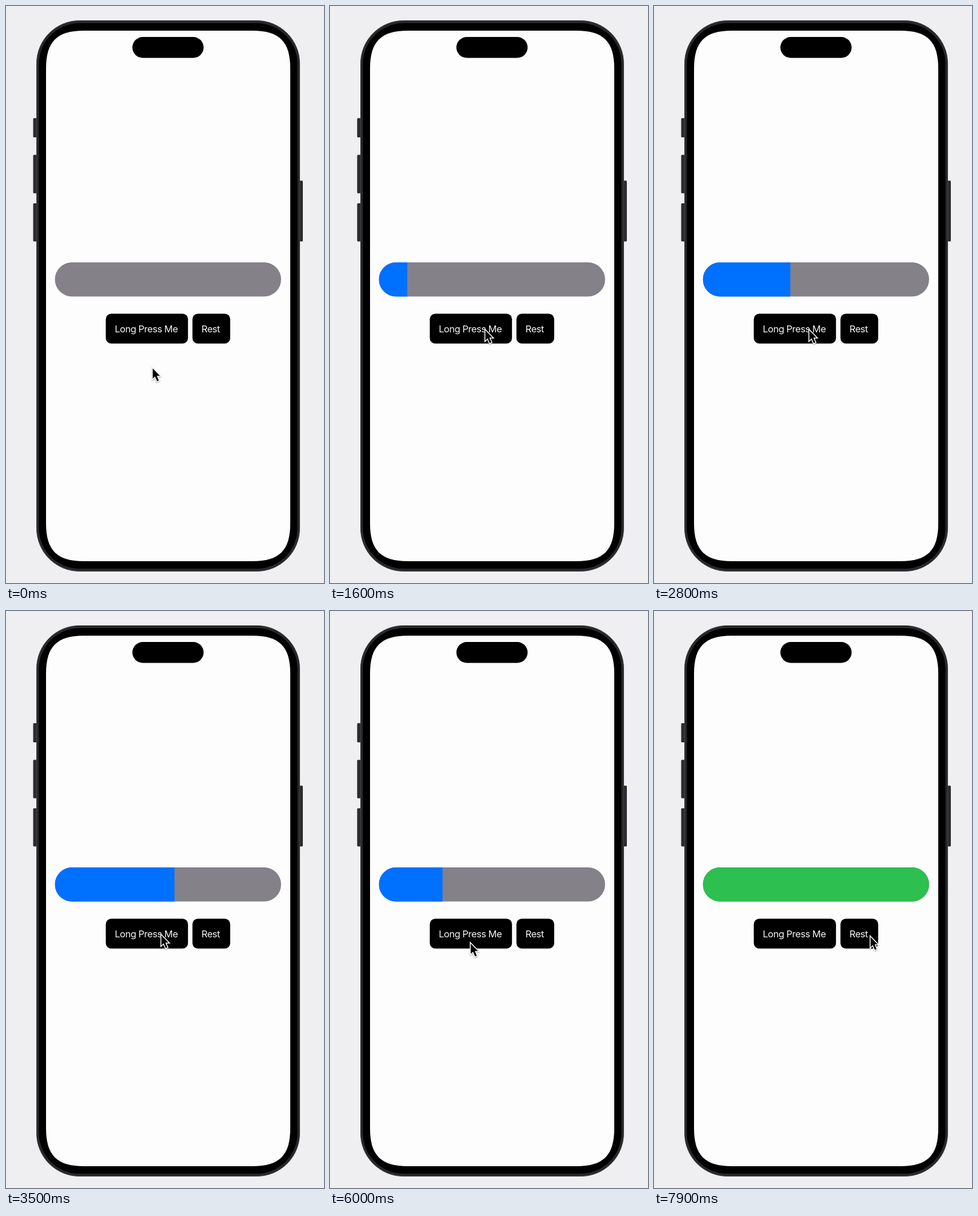
Animation, 556 px wide and 1006 px high, one loop 8000 ms. Source, as an HTML page:

```html
<!DOCTYPE html>
<html lang="en">
<head>
<meta charset="utf-8">
<title>Long press progress</title>
<style>
  html, body { margin: 0; width: 100%; height: 100%; overflow: hidden; background: #efeef1; }
  svg { display: block; width: 556px; height: 1006px; }
  text { font: 16.5px Inter, "Open Sans", sans-serif; letter-spacing: -.48px; fill: #f6f6f6; }
  #cursor path { stroke: #fff; stroke-width: 3; paint-order: stroke; }
  #cursor { filter: drop-shadow(0 1.5px 1.3px rgba(0, 0, 0, .4)); }
</style>
</head>
<body>
<svg viewBox="0 0 556 1006">
  <defs>
    <clipPath id="capsule"><rect x="85.5" y="447" width="395.5" height="59.5" rx="29.75"/></clipPath>
  </defs>

  <g fill="#2b2a2d">
    <rect x="47.5" y="195.5" width="8" height="33.5" rx="1.5"/>
    <rect x="47.5" y="259.5" width="8" height="67" rx="1.5"/>
    <rect x="47.5" y="344" width="8" height="66.5" rx="1.5"/>
    <rect x="511" y="304.5" width="8" height="106" rx="1.5"/>
  </g>
  <rect x="53.5" y="25.5" width="460" height="960" rx="75" fill="#28272a" stroke="#434246"/>
  <rect x="57.5" y="30" width="452" height="951" rx="71"/>
  <path d="M70 109C70 62 89 43 136 43H431C478 43 497 62 497 109V902C497 949 478 968 431 968H136C89 968 70 949 70 902Z" fill="#fefdfe"/>
  <rect x="221" y="54" width="124.5" height="36.5" rx="18.25"/>

  <g clip-path="url(#capsule)">
    <rect x="85" y="446" width="397" height="62" fill="#848188"/>
    <rect id="fill" x="85.5" y="446" width="0" height="62"/>
  </g>

  <rect x="174.5" y="536.5" width="143.7" height="52" rx="9.5"/>
  <rect x="326" y="536.5" width="66" height="52" rx="9.5"/>
  <text x="190.2" y="568.8">Long Press Me</text>
  <text x="341.8" y="568.8">Rest</text>

  <g id="cursor"><path d="M1.5 3.2V21.2L5.6 17.4L9.2 25.8L12.2 24.5L8.7 16.2H14.2Z"/></g>
</svg>
<script>
const LOOP = 8000, STEP = 100, BAR = 395.5;
const RISE = 1200, FALL = 300;
const fill = document.getElementById('fill');
const cursor = document.getElementById('cursor');

// Early releases shrink the bar; completed presses turn it green until reset.
const presses = [
  { start: 524, release: 1381 },
  { start: 1798, release: 2645 },
  { start: 2880, done: 3880, reset: 4950 },
  { start: 5559, done: 6560, reset: LOOP }
];

const moves = [
  { from: 30, to: 400, x: 270, y: 562 },
  { from: 4300, to: 4500, x: 344.5, y: 562.5 },
  { from: 5030, to: 5500, x: 244.5, y: 576.5 },
  { from: 7500, to: 7900, x: 377, y: 565 }
];

const clamp = v => Math.min(1, Math.max(0, v));

// Cubic ease-in-out with control points (.42, 0) and (.58, 1).
function ease(u) {
  u = clamp(u);
  let lo = 0, hi = 1;
  for (let i = 0; i < 24; i++) {
    const s = (lo + hi) / 2, r = 1 - s;
    const x = 3 * r * r * s * .42 + 3 * r * s * s * .58 + s * s * s;
    if (x < u) lo = s; else hi = s;
  }
  return lo * lo * (3 - 2 * lo);
}

function progress(p, t) {
  if (p.done) return t >= p.reset ? 0 : t >= p.done ? 1 : ease((t - p.start) / RISE);
  const held = ease((Math.min(t, p.release) - p.start) / RISE);
  return held * (1 - ease((t - p.release) / FALL));
}

function render(t) {
  const green = presses.some(p => p.done && t >= p.done && t < p.reset);
  fill.setAttribute('width', BAR * Math.max(...presses.map(p => progress(p, t))));
  fill.setAttribute('fill', green ? '#2dbf50' : '#0070ff');

  let x = 255, y = 628.5;
  for (const m of moves) {
    const k = ease((t - m.from) / (m.to - m.from));
    x += (m.x - x) * k;
    y += (m.y - y) * k;
  }
  cursor.setAttribute('transform', `translate(${x} ${y})`);
}

function tick() {
  render(Math.floor(performance.now() % LOOP / STEP) * STEP);
  requestAnimationFrame(tick);
}
tick();
</script>
</body>
</html>
```
